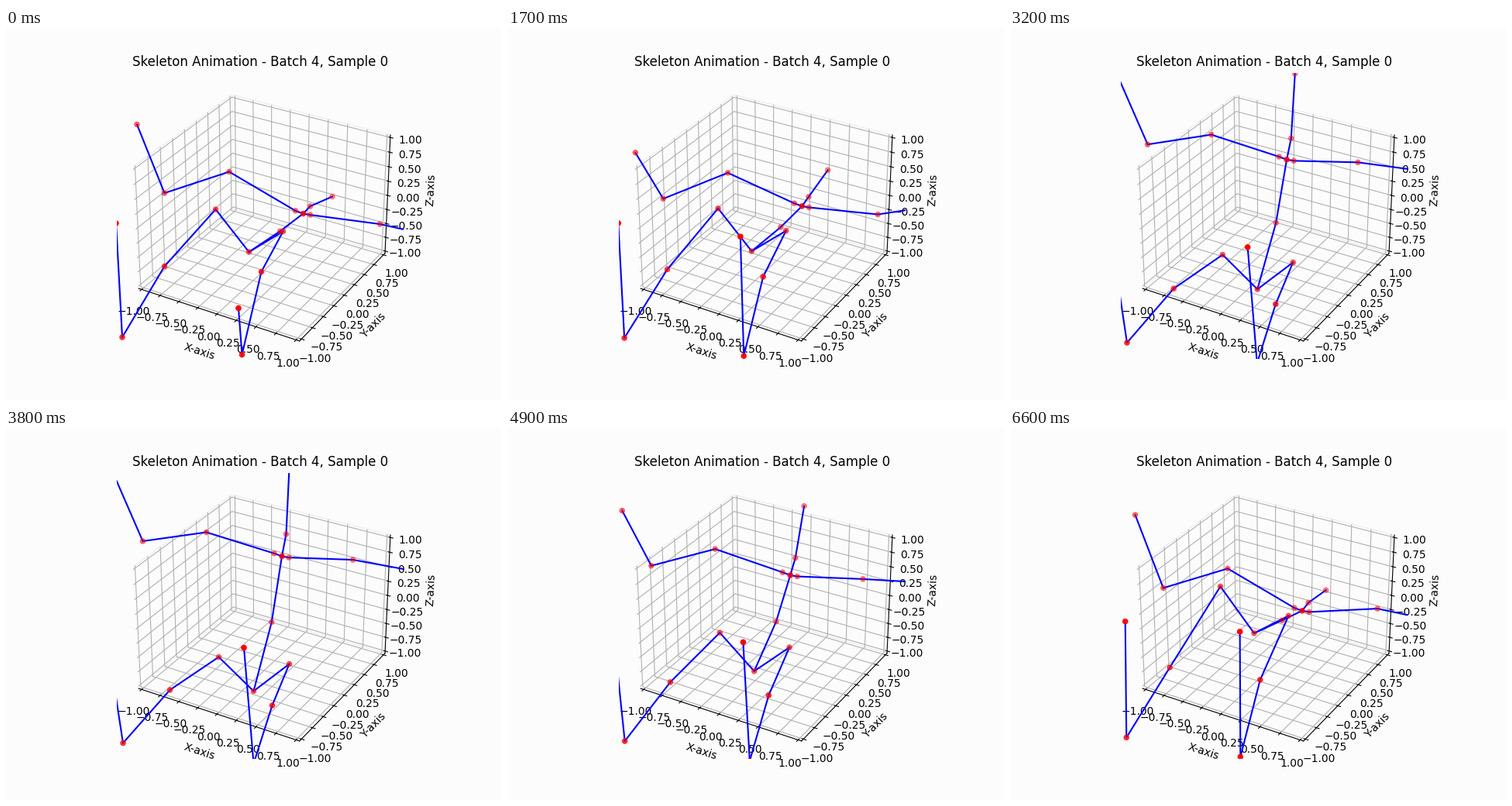
Animation of 640 by 480 pixels, one loop 6700 ms. Source, as a matplotlib script:

```python
import numpy as np
import matplotlib.pyplot as plt
from matplotlib.animation import FuncAnimation

W, H = 640, 480
FRAMES, INTERVAL = 67, 100
PAPER = "#fcfcfc"

# The body crouches, springs up fast, hangs tall, then sinks back
BEATS = [0, 17, 26, 31, 38, 42, 49, 58, 66]
PHASE = [0, 1, 2, 2.9, 3, 3.13, 4, 5, 6]

# Shared movements: 0 is the starting crouch, 1 the full travel
MOVES = {
    "lean": [0, 0.15, 0.53, 1, 0.70, 0.33, 0.24],
    "rise": [0, 0.13, 0.33, 1, 0.67, 0.11, 0.05],
    "sink": [0, -0.02, 0.44, 1, 0.49, -0.27, -0.48],
    "swing": [0, 1, 0.27, 0, 0.6, -0.16, -0.2],
    "reach": [0, 0.42, 1, 0, 0.2, 0.3, 0],
    "step": [0, 1, 1, 1, 1, 1, 1],
}

# (x move, y move): joint -> start x, y, travel x, y (pixels), opacity
JOINTS = {
    ("lean", "rise"): {
        "neck": (383.5, 239.5, -27.5, -74, 0.78),
        "nose": (392.5, 230, -31, -93, 0.45),
        "head": (421, 217.5, -55.5, -165.5, 0.42),
        "r_elbow": (288, 185.5, -29.5, -51, 0.47),
        "r_wrist": (204.5, 213, -28, -67, 0.5),
        "r_hand": (169, 124.5, -31, -67, 0.52),
        "r_knee": (204.5, 307.5, 7, 30.5, 0.65),
        "r_ankle": (150, 399, 1, 7.5, 0.72),
    },
    ("lean", "sink"): {
        "pelvis": (313.5, 289, 6, 50.5, 0.56),
        "r_hip": (270.5, 234, 4, 61.5, 0.57),
        "l_hip": (357.5, 262.5, 8, 42, 0.6),
    },
    ("lean", "lean"): {
        "l_elbow": (482.5, 253, -35, -83, 0.47),
        "l_wrist": (540, 266, 0, -79, 0.4),
    },
    ("sink", "lean"): {
        "l_knee": (329.5, 314.5, 14, 43.5, 0.75),
        "l_ankle": (304.5, 421.5, 15, 11.5, 0.87),
    },
    ("sink", "sink"): {
        "r_toe": (142, 252, -14, 5, 0.93),
        "l_toe": (300, 361.5, 7, 14, 1.0),
    },
}

# Extra vertical motion on top of the shared moves
EXTRAS = {
    "head": ("reach", -30), "l_wrist": ("reach", -55),
    "r_elbow": ("swing", 8), "r_wrist": ("swing", 16), "r_hand": ("swing", 45),
    "l_toe": ("step", -92),
}

CHAINS = [
    "pelvis spine neck nose head",
    "pelvis r_hip r_knee r_ankle r_toe",
    "pelvis l_hip l_knee l_ankle l_toe",
    "neck r_shoulder r_elbow r_wrist r_hand",
    "neck l_shoulder l_elbow l_wrist",
]
BONES = [pair for c in CHAINS for pair in zip(c.split(), c.split()[1:])]


def pose(i):
    u = np.interp(i, BEATS, PHASE)
    move = {name: np.interp(u, range(7), keys) for name, keys in MOVES.items()}
    pts = {}
    for (mx, my), group in JOINTS.items():
        for name, (x, y, dx, dy, _) in group.items():
            pts[name] = np.array([x + dx * move[mx], y + dy * move[my]])
    for name, (m, dy) in EXTRAS.items():
        pts[name][1] += dy * move[m]
    neck = pts["neck"]
    pts["spine"] = (neck + pts["pelvis"]) / 2 + (5, -2)
    pts["r_shoulder"] = neck + (-10, -3.7)
    pts["l_shoulder"] = neck + (9, 1.6)
    return pts


fig = plt.figure(figsize=(W / 100, H / 100), dpi=100, facecolor=PAPER)
ax = fig.add_subplot(projection="3d", facecolor=PAPER)
span = (-25 / 24, 25 / 24)  # a small margin beyond the outer ticks
ax.set(xlim=span, ylim=span, zlim=span,
       xlabel="X-axis", ylabel="Y-axis", zlabel="Z-axis")
ax.set_title("Skeleton Animation - Batch 4, Sample 0")
for axis in (ax.xaxis, ax.yaxis, ax.zaxis):
    axis.pane.set(facecolor=PAPER, edgecolor="#f0f0f0", alpha=1)

# Flat layer in pixel units over the square plot area, which clips the figure
side = 0.77 * H
left = 328 - side / 2
bottom = H - 0.11 * H
layer = fig.add_axes([left / W, 0.11, side / W, 0.77])
layer.set(xlim=(left, left + side), ylim=(bottom, bottom - side))
layer.axis("off")

alpha = {name: row[-1] for group in JOINTS.values() for name, row in group.items()}
start = pose(0)
colors = [(1, 0, 0, alpha.get(name, 0.46)) for name in start]
lines = [layer.plot([], [], color="b", lw=1.5)[0] for _ in BONES]
dots = layer.scatter(*zip(*start.values()), s=20, c=colors, zorder=3)


def update(i):
    pts = pose(i)
    for line, (a, b) in zip(lines, BONES):
        line.set_data(*zip(pts[a], pts[b]))
    dots.set_offsets(list(pts.values()))
    return [*lines, dots]


anim = FuncAnimation(fig, update, frames=FRAMES, interval=INTERVAL,
                     repeat=True, repeat_delay=0, blit=False)
plt.show()
```
